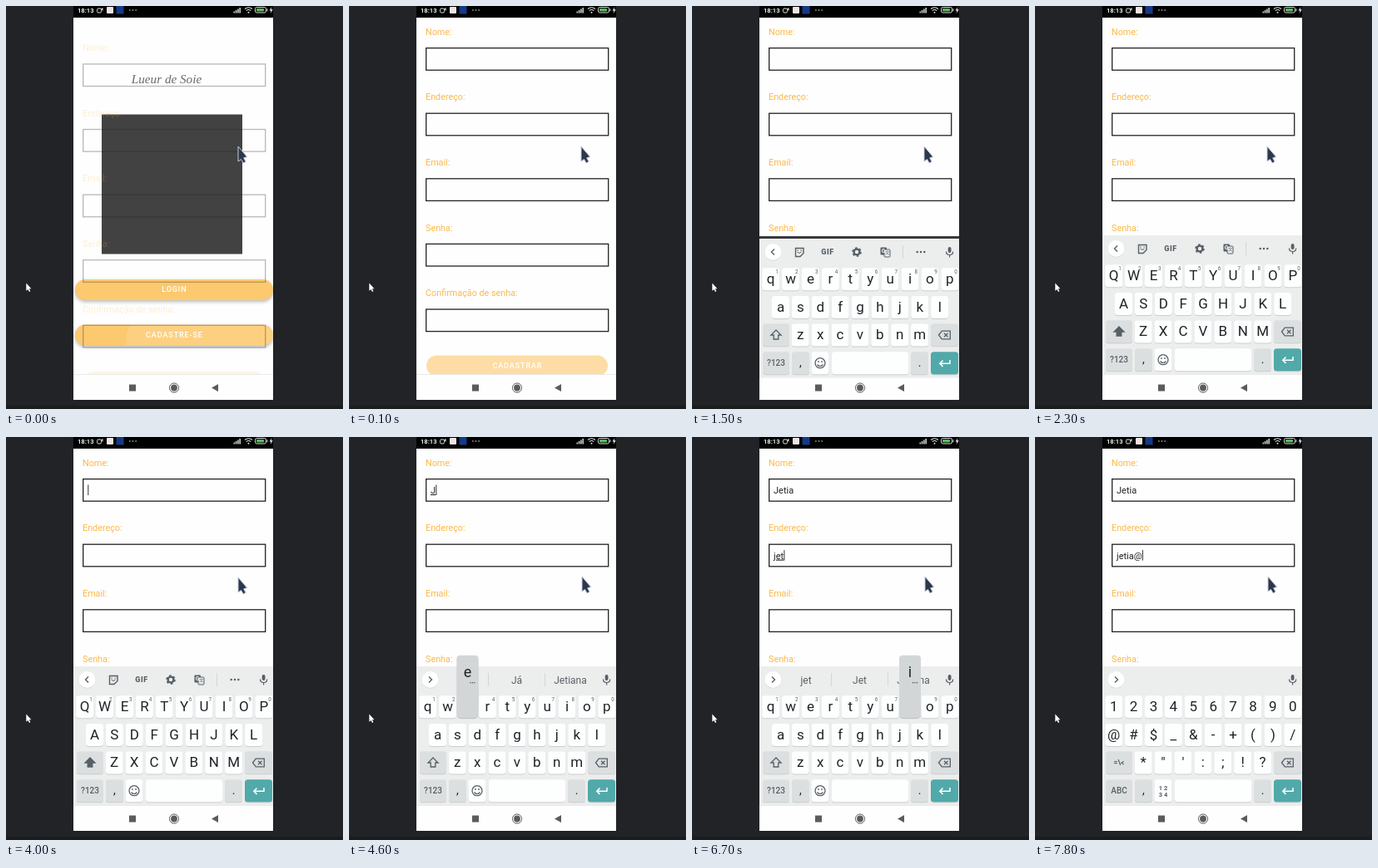
Recreate the animation shown at these times as an HTML page. Size 405 px wide and 485 px high, loop 8 s.

```html
<!DOCTYPE html>
<html lang="pt">
<head>
<meta charset="utf-8">
<title>Cadastro</title>
<style>
  html, body { margin: 0; width: 100%; height: 100%; overflow: hidden; background: #212326; }
  svg { display: block; width: 405px; height: 485px; }
  text { font-family: Roboto, "Noto Sans", sans-serif; white-space: pre; }
  .wordmark { font: italic 15.2px "Liberation Serif", serif; }
  .raised { filter: drop-shadow(0 2px 2px rgba(0, 0, 0, .28)); }
</style>
</head>
<body>
<svg id="stage" viewBox="0 0 405 485"></svg>
<script>
const LOOP = 8000;
const ORANGE = '#fdb849', AMBER = '#fdc96f', INK = '#1d2528', ICON = '#566066';

// Each step changes part of the state at its time.
const STEPS = [
  [0, { scene: 'login', fade: 0.16, caret: false, field: 0, words: ['', ''],
        keys: null, lift: 0, hints: null, popup: null, underline: false, nudge: 0 }],
  [100, { scene: 'form', fade: 0.62 }],
  [300, { fade: 1 }],
  [1500, { keys: 'lower', lift: 4 }],
  [1700, { lift: 0 }],
  [1900, { keys: 'upper', caret: true }],
  [2300, { caret: false }],
  [3100, { caret: true }],
  [3500, { caret: false }],
  [4000, { caret: true }],
  [4200, { popup: 'J' }],
  [4500, { popup: null, keys: 'lower', words: ['J', ''], underline: true, hints: ['J', 'Já', 'Jetiana'], nudge: 1 }],
  [4600, { popup: 'e' }],
  [4700, { popup: null, words: ['Je', ''], hints: ['Je', 'Jé', 'Jetiana'] }],
  [4800, { words: ['Jet', ''], hints: ['Jet', 'Jét', 'Jetiana'] }],
  [5100, { words: ['Jeti', ''], hints: ['Jeti', 'Jetia', 'Jetiana'] }],
  [5300, { words: ['Jetia', ''], hints: ['Jetia', 'Jétia', 'Jetiana'] }],
  [5500, { field: 1, underline: false, hints: null }],
  [5900, { words: ['Jetia', 'j'], underline: true, hints: ['j', 'J', 'Jetiana'] }],
  [6300, { words: ['Jetia', 'je'], hints: ['je', 'Je', 'Jetiana'] }],
  [6700, { words: ['Jetia', 'jet'], hints: ['jet', 'Jet', 'Jetiana'], popup: 'i' }],
  [6900, { words: ['Jetia', 'jeti'], hints: ['jeti', 'Jeti', 'Jetiana'], popup: null }],
  [7200, { words: ['Jetia', 'jetia'], hints: ['jetia', 'Jetia', 'Jetiana'] }],
  [7400, { keys: 'symbols' }],
  [7800, { words: ['Jetia', 'jetia@'], underline: false, hints: [] }]
];

const LAYOUT = {
  lower: ['qwertyuiop', 'asdfghjkl', 'zxcvbnm'],
  upper: ['QWERTYUIOP', 'ASDFGHJKL', 'ZXCVBNM'],
  symbols: ['1234567890', '@#$_&-+()/', '*"\':;!?']
};

const escape = s => s.replace(/&/g, '&amp;').replace(/</g, '&lt;');
const rect = (x, y, w, h, fill, r = 0, extra = '') =>
  `<rect x="${x}" y="${y}" width="${w}" height="${h}" rx="${r}" fill="${fill}" ${extra}/>`;
const path = (d, fill, stroke = 'none', width = 1, extra = '') =>
  `<path d="${d}" fill="${fill}" stroke="${stroke}" stroke-width="${width}" ${extra}/>`;
const circle = (x, y, r, fill, extra = '') =>
  `<circle cx="${x}" cy="${y}" r="${r}" fill="${fill}" ${extra}/>`;
// Text centred vertically on the capitals around y.
const text = (s, x, y, size, fill, extra = '') =>
  `<text x="${x}" y="${y + size * 0.36}" font-size="${size}" fill="${fill}" ${extra}>${escape(s)}</text>`;
const mid = (s, x, y, size, fill, extra = '') => text(s, x, y, size, fill, `text-anchor="middle" ${extra}`);
const group = (body, extra) => `<g ${extra}>${body}</g>`;
const dots = (x, y, gap, r, fill) => [-1, 0, 1].map(i => circle(x + i * gap, y, r, fill)).join('');
const caps = (s, y) => mid(s, 202.4, y, 9, '#fff', 'font-weight="500" letter-spacing=".9"');

function statusBar() {
  const bars = [0, 1, 2, 3].map(i => rect(273.5 + i * 2.3, 6.5 - i * 1.5, 1.6, 2 + i * 1.5, '#ccc')).join('');
  return rect(81, 0, 240, 14, '#000') +
    text('18:13', 86, 5, 7.6, '#eee', 'font-weight="700"') +
    rect(109.5, 3, 5, 5, 'none', 1.5, 'stroke="#ddd"') + path('M114 3.500l2.500-1.500v4z', '#ddd') +
    rect(121, 1, 8, 8, '#eee4e2', 1) + rect(132.5, 0, 9, 9.5, '#173a86') +
    dots(152.5, 5, 3.6, 0.8, '#ddd') + bars +
    path('M287 3.500q4.500-3.500 9 0M288.700 5.600q2.800-2.200 5.600 0', 'none', '#ddd', 1.2) + circle(291.5, 7.8, 1, '#ddd') +
    rect(299.5, 1.5, 13, 6.5, 'none', 2, 'stroke="#ddd"') + rect(301, 3, 9, 3.5, '#58b85a', 1) +
    rect(313.5, 3.3, 1, 3, '#ddd') + path('M319.500 1l-3 4.500h2l-.8 3.500 3-4.800h-2z', '#eee');
}

function navBar() {
  return rect(81, 443, 240, 31, '#fefefe') + rect(81, 443, 240, 0.8, '#e4e4e4') +
    rect(148, 455.5, 8, 8, '#5b5b5b') +
    circle(202, 459.5, 5.6, 'none', 'stroke="#5b5b5b"') + circle(202, 459.5, 3.9, '#5b5b5b') +
    path('M247 459.500l8-4.500v9z', '#5b5b5b');
}

function form(dy, boxOpacity, labelOpacity, buttonOpacity) {
  const names = ['Nome:', 'Endereço:', 'Email:', 'Senha:', 'Confirmação de senha:'];
  const rows = names.map((name, i) => {
    const y = i * 78.6;
    return text(name, 92, 31 + y, 10.8, ORANGE, `opacity="${labelOpacity}"`) +
      rect(92.7, 50.6 + y, 219, 26.6, 'none', 0, `stroke="#222" stroke-width="1.3" opacity="${boxOpacity}"`);
  }).join('');
  const button = rect(93, 420.5, 218, 25, AMBER, 12.5) + caps('CADASTRAR', 432.5);
  return group(rows + group(button, `opacity="${buttonOpacity}"`), `transform="translate(0 ${dy})"`);
}

function login() {
  const button = (label, y) => rect(83, y, 238, 25, AMBER, 12.5, 'class="raised"') + caps(label, y + 12);
  return mid('Lueur de Soie', 193, 88, 15.2, '#6a6a6a', 'class="wordmark"') +
    rect(115, 130.5, 169, 168, '#424242') + button('LOGIN', 329) + button('CADASTRE-SE', 383.5) +
    path('M144 408.500q0-15 5-25h160a12 12 0 0 1 0 25z', '#fff', 'none', 0, 'opacity=".12"');
}

function key(label, x, y, w = 21, fill = '#fdfefe', size = 17, color = INK) {
  return rect(x - w / 2, y - 12.5, w, 27, '#cbced0', 3.5) + rect(x - w / 2, y - 13.5, w, 27, fill, 3.5) +
    (label ? mid(label, x, y - 1, size, color) : '');
}

const rowKeys = (letters, row) => [...letters].map((label, i) => {
  const left = row === 2 ? 130.2 : letters.length === 9 ? 106.5 : 94.7;
  return { label, x: left + i * 23.9, y: 324.7 + row * 33.7, number: row ? '' : (i + 1) % 10 };
});

function toolbar(hints) {
  const mic = rect(307.7, 286, 3.8, 7, ICON, 1.9) +
    path('M305.500 291.500q0 4 4.100 4t4.100-4M309.600 295.500v3', 'none', ICON, 1.2);
  const arrow = hints ? 'M96 288.500l3.500 3.500-3.500 3.500' : 'M99 288.500l-3.500 3.500 3.500 3.500';
  const left = circle(97.5, 292.6, 10, '#d4d6d7') + circle(97.5, 292, 10, '#fff') + path(arrow, 'none', ICON, 1.4);
  const bar = x => rect(x, 284, 0.8, 16, '#ccd0d2');
  if (hints) {
    return left + mic + (hints.length ? bar(167) + bar(235) : '') +
      hints.map((s, i) => mid(s, 137 + i * 64.5, 292.5, 12, '#596166')).join('');
  }
  const sticker = path('M124.500 287.500h9.500v6l-4 4h-5.500z', 'none', ICON, 1.4) +
    path('M126.500 292q2.500 3 5 0', 'none', ICON) + rect(126.5, 289.5, 1.2, 1.2, ICON) + rect(130.5, 289.5, 1.2, 1.2, ICON);
  const gear = circle(198, 292, 3.4, 'none', `stroke="${ICON}" stroke-width="2.4"`) +
    circle(198, 292, 4.9, 'none', `stroke="${ICON}" stroke-width="1.8" stroke-dasharray="2.6 2.53"`);
  const translate = rect(226.5, 286.5, 7.5, 9, ICON, 1) + rect(231, 289, 7, 9, '#eceded', 1, `stroke="${ICON}"`) +
    mid('G', 230, 291, 6.5, '#fff', 'font-weight="700"') + mid('文', 234.7, 293.5, 5.5, ICON);
  return left + mic + sticker + mid('GIF', 163, 292, 9, ICON, 'font-weight="900" letter-spacing=".6"') +
    gear + translate + bar(253) + dots(275, 292, 4.3, 1.25, ICON);
}

function popupKey({ label, x, y, number }) {
  return rect(x - 13, y - 61, 26, 75, '#000', 4, 'opacity=".14"') + rect(x - 13, y - 62, 26, 75, '#d3d6d7', 4) +
    mid(label, x, y - 42, 18, INK) + (number === '' ? '' : dots(x + 6, y - 29, 2.4, 0.6, INK));
}

function keyboard({ keys, hints, popup, lift }) {
  const symbols = keys === 'symbols', GREY = '#dcdfe0';
  const all = LAYOUT[keys].flatMap(rowKeys);
  const letters = all.map(k => key(k.label, k.x, k.y) +
    (symbols ? '' : mid(String(k.number), k.x + 7.2, k.y - 9, 6.3, '#596166'))).join('');
  const shift = symbols ? mid('=\\<', 101, 391.5, 8.5, ICON, 'font-weight="700"') :
    path('M101 386l6 6h-3.200v5h-5.600v-5h-3.200z', keys === 'upper' ? ICON : 'none', ICON, 1.3);
  const face = symbols ? mid('1 2', 154, 422, 7.5, ICON, 'font-weight="700"') + mid('3 4', 154, 430, 7.5, ICON, 'font-weight="700"') :
    circle(154, 425.7, 6, 'none', `stroke="${ICON}" stroke-width="1.3"`) +
    circle(152, 424, 0.9, ICON) + circle(156, 424, 0.9, ICON) + path('M150.500 427.500q3.500 4 7 0', 'none', ICON, 1.2);
  const body = rect(81, 276, 240, 167.5, '#eceded') + toolbar(hints) + letters +
    key('', 101, 391.8, 32, GREY) + shift + key('', 303.5, 391.8, 33, GREY) +
    path('M296.500 392l3.800-4.800h10v9.600h-10zM303 389.700l4.500 4.600M307.500 389.700l-4.500 4.600', 'none', ICON, 1.3) +
    key('', 101, 425.7, 32, GREY) + mid(symbols ? 'ABC' : '?123', 101, 425.7, 10, ICON, 'font-weight="500"') +
    key(',', 130.5, 425.7, 21, GREY, 14) + key('', 154, 425.7, 21) + face +
    key('', 214, 425.7, 92) + key('.', 273.5, 425.7, 21, GREY, 14) + key('', 303.5, 425.7, 33, '#52a9a9') +
    path('M310 422v4.200h-12M301.500 422.500l-3.700 3.700 3.700 3.700', 'none', '#fff', 1.5) +
    (popup ? popupKey(all.find(k => k.label === popup)) : '');
  return (lift ? rect(81, 277, 240, 6, '#3a3a3a') : '') + group(body, `transform="translate(0 ${lift})"`);
}

function pointers(nudge) {
  return path('M24.300 333.500v9.300l2.100-1.900 1.500 3.100 1.400-.7-1.400-3h2.500z', '#fff') +
    group(path('M279 169v18l3.500-2.500 2.700 4.500 3-1.700-2.500-4.500 4-1.300z', '#2c394c', '#c9cce0', 1),
      `transform="translate(${nudge} ${-nudge})"`);
}

const stage = document.getElementById('stage');

function render(s) {
  const screen = s.scene === 'login' ? login() + form(19.3, 0.32, 0.22, s.fade) : form(0, 1, 1, s.fade);
  const typed = s.words.map((word, i) => text(word, 98, 64 + i * 78.6, 11, '#222',
    `class="typed" ${s.underline && i === s.field ? 'text-decoration="underline"' : ''}`)).join('');
  stage.innerHTML = rect(0, 0, 405, 485, '#212326') + rect(0, 481, 405, 4, '#1b1c1e') +
    rect(81, 0, 240, 474, '#fefefe') + screen + typed + navBar() + (s.keys ? keyboard(s) : '') +
    statusBar() + pointers(s.nudge);
  if (s.caret) {
    const width = stage.querySelectorAll('.typed')[s.field].getComputedTextLength();
    stage.insertAdjacentHTML('beforeend', rect(98.3 + width, 57.5 + s.field * 78.6, 1, 12.5, '#333'));
  }
}

const start = performance.now();
let shown = -1;
function tick() {
  const time = (performance.now() - start) % LOOP;
  const count = STEPS.filter(([at]) => at <= time).length;
  if (count !== shown) {
    shown = count;
    render(Object.assign({}, ...STEPS.slice(0, count).map(([, change]) => change)));
  }
  requestAnimationFrame(tick);
}
tick();
</script>
</body>
</html>
```
